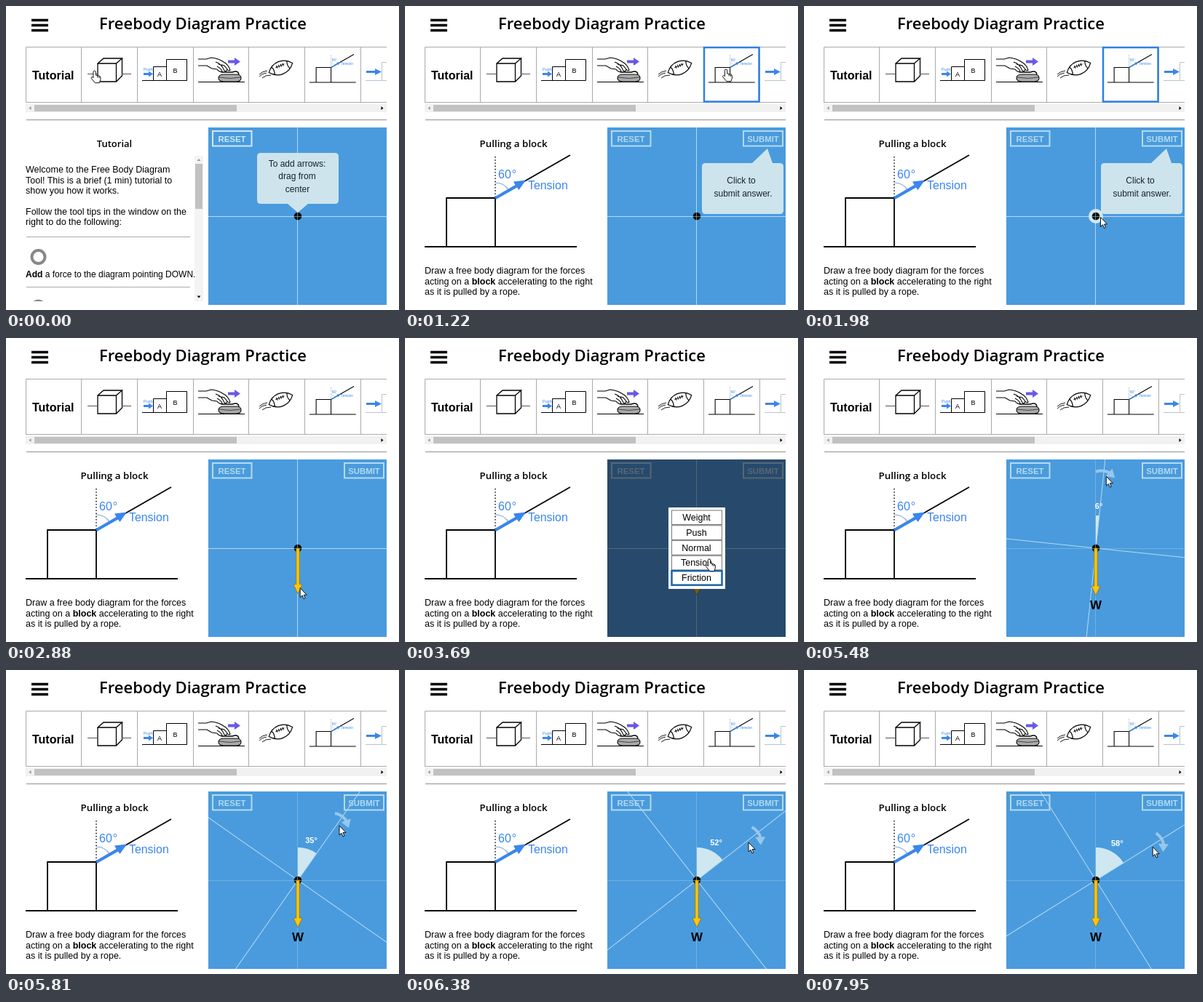
An HTML page for the animation above (8 s loop, 540 px wide and 418 px high).

```html
<!DOCTYPE html>
<html lang="en">
<head>
<meta charset="utf-8">
<title>Freebody Diagram Practice</title>
<style>
html, body { margin: 0; width: 100%; height: 100%; overflow: hidden; background: #fff; }
svg { display: block; }
text { font-family: "Liberation Sans", Arial, sans-serif; font-size: 12.5px; }
.head { font-family: "Open Sans", "Noto Sans", sans-serif; font-weight: 600; text-anchor: middle; }
.mid { text-anchor: middle; }
.bold { font-weight: bold; }
.blue { fill: #3a86ec; stroke: none; }
.tip text { font-size: 12px; fill: #16222a; text-anchor: middle; }
.tip path { fill: #d3e8ee; opacity: .96; }
.button rect { fill: none; stroke: currentColor; stroke-width: 2; }
.button text { font-size: 11.4px; font-weight: bold; fill: currentColor; text-anchor: middle; }
.line { fill: none; stroke: #000; }
</style>
</head>
<body>
<svg width="540" height="418" viewBox="0 0 540 418">
  <defs>
    <clipPath id="stripClip"><rect x="26" y="55" width="497" height="79"/></clipPath>
    <clipPath id="textClip"><rect x="20" y="200" width="240" height="206"/></clipPath>
    <g id="pull">
      <path class="line" d="M27 331H236M57 264H124V331H57ZM124 264L227 205"/>
      <path d="M124 207V264" stroke="#222" stroke-width="1.6" stroke-dasharray="1.6 2.6"/>
      <path d="M124 243A21 21 0 0 1 142.500 253.500" fill="none" stroke="#7fa9d8" stroke-width="1.200"/>
      <path class="blue" d="M123 262.500L151.500 246L149 241.500L166 239.500L156.500 253L154 249.500L125 266Z"/>
      <text class="blue" x="128" y="237" style="font-size:16px">60<tspan dx="1">°</tspan></text>
      <text class="blue" x="169" y="252" style="font-size:15.900px">Tension</text>
    </g>
  </defs>

  <path d="M35 19.500H58M35 26.500H58M35 33.500H58" stroke="#000" stroke-width="3.400"/>
  <text class="head" x="270.500" y="32" style="font-size:22px">Freebody Diagram Practice</text>

  <!-- thumbnail strip -->
  <g clip-path="url(#stripClip)">
    <path d="M27.500 132V56.500H523M103.500 56V132M180.500 56V132M257.500 56V132M333.500 56V132M410.500 56V132M487.500 56V132M27 132.500H523" fill="none" stroke="#aaa"/>
    <text class="bold" x="36" y="100.500" style="font-size:16px">Tutorial</text>
    <path class="line" d="M126 79H151.500V104H126ZM126 79L134 72H159.500L151.500 79M159.500 72V96L151.500 104" stroke-width="1.300"/>
    <path d="M112 93.500H126M159 93.500H172" stroke="#555"/>
    <path class="line" d="M187 102.500H248.500V73.500H220.500V102M202.500 102V83.500H220"/>
    <path class="blue" d="M189 92H196V89.500L202 93.500L196 97.500V95H189Z"/>
    <text class="blue" x="189" y="89" style="font-size:5.500px">Push</text>
    <text class="mid" x="211" y="96.500" style="font-size:9px">A</text>
    <text class="mid" x="232.500" y="91.500" style="font-size:9px">B</text>
    <path class="line" d="M264 104.500H328"/>
    <path d="M292 99Q292 94 300 94H316Q323 94 323 99Q323 104 316 104H300Q292 104 292 99Z" fill="#aaa" stroke="#111" stroke-width="1.200"/>
    <path d="M293 98Q308 101 322 98" fill="none" stroke="#444"/>
    <path class="line" d="M296 91H311Q319 88 320 94" stroke-width="1.500"/>
    <path class="line" d="M264 73H275L282 71Q292 72 299 77Q305 80 308 88Q306 90 304 87L300 82L292 80M264 82H276L283 86L290 87Q294 92 297 90Q296 86 290 83M288 77Q296 79 300 89Q303 91 304 87" stroke-width="1.100"/>
    <path fill="#6858e8" d="M305 74.500H314V71L322 76.500L314 82V78.500H305Z"/>
    <g class="line" transform="rotate(-22 377.500 85)">
      <path d="M360 85Q367 76 377.500 76Q388 76 395 85Q388 94 377.500 94Q367 94 360 85ZM366 79Q369 85 366 91M389 79Q386 85 389 91" stroke-width="1.200"/>
      <path d="M371 82H384M373 80V84M376 80V84M379 80V84M382 80V84"/>
    </g>
    <path class="line" d="M348 97Q351 93 358 92M352 99Q356 95 364 95M348 94Q352 90 359 89" stroke-width=".9"/>
    <use href="#pull" transform="translate(417 105) scale(.305) translate(-27 -331)" stroke-width="3.500"/>
    <path class="blue" d="M495 89H507V86L516 90.500L507 95V92H495Z"/>
    <path d="M530 77.500H516.500V102.500H530M494 102.500H516" fill="none" stroke="#b8c4cc"/>
  </g>
  <rect id="chosen" x="411" y="57" width="75.500" height="74.500" fill="none" stroke="#2f80e4" stroke-width="2.500"/>
  <rect x="27" y="135" width="496" height="11" fill="#f1f1f1"/>
  <rect x="39" y="136" width="278" height="9" fill="#c1c1c1"/>
  <path d="M34.500 138V143L31.500 140.500Z" fill="#999"/>
  <path d="M515.500 138V143L518.500 140.500Z"/>
  <path d="M28 156.500H523" stroke="#aaa" stroke-width="1.300"/>

  <g id="intro">
    <text class="head" x="149" y="194" style="font-size:13px">Tutorial</text>
    <g clip-path="url(#textClip)">
      <text x="27" y="229">Welcome to the Free Body Diagram</text>
      <text x="27" y="243.500">Tool! This is a brief (1 min) tutorial to</text>
      <text x="27" y="258">show you how it works.</text>
      <text x="27" y="286.500">Follow the tool tips in the window on the</text>
      <text x="27" y="301">right to do the following:</text>
      <path d="M28 317.500H253M28 386.500H253" stroke="#aaa"/>
      <g fill="none" stroke="#888" stroke-width="4"><circle cx="44.500" cy="345" r="9"/><circle cx="44.500" cy="414.500" r="9"/></g>
      <text x="27" y="373" style="font-size:12px"><tspan class="bold">Add</tspan> a force to the diagram pointing DOWN.</text>
    </g>
    <rect x="259" y="206" width="12" height="200" fill="#f4f4f4"/>
    <rect x="260" y="217" width="10" height="62" fill="#c1c1c1"/>
    <path d="M262.500 213H267.500L265 210Z" fill="#999"/>
    <path d="M262.500 398.500H267.500L265 401.500Z"/>
  </g>

  <g id="task">
    <text class="head" x="149" y="194" style="font-size:13.400px">Pulling a block</text>
    <use href="#pull" stroke-width="1.800"/>
    <text x="27" y="368">Draw a free body diagram for the forces</text>
    <text x="27" y="382.500">acting on a <tspan class="bold">block</tspan> accelerating to the right</text>
    <text x="27" y="397">as it is pulled by a rope.</text>
  </g>

  <!-- drawing panel -->
  <svg x="278" y="167" width="245" height="244" viewBox="278 167 245 244">
    <rect x="278" y="167" width="245" height="244" fill="#4a9bdd"/>
    <path id="axes" d="M400.500 167V411M278 289.500H523" stroke="#b4d8f0"/>
    <g id="reset" class="button"><rect x="284" y="172" width="53.500" height="20.500"/><text x="310.500" y="186.500">RESET</text></g>
    <g id="submit" class="button" color="#b4daee"><rect x="465" y="172" width="54" height="20.500"/><text x="492" y="186.500">SUBMIT</text></g>
    <path id="wedge" fill="#cfe7f0"/>
    <g id="turner">
      <path id="cross" d="M401 39V539M151 289H651" stroke="#b4daee"/>
      <path d="M390 184.500Q400 180 410 184.500" fill="none" stroke="#98c7ec" stroke-width="4"/>
      <path d="M412 178L417 190L404 189.500Z" fill="#98c7ec"/>
    </g>
    <text id="degrees" class="mid bold" fill="#fff" style="font-size:11px"></text>
    <circle id="ring" cx="401" cy="289" r="10" fill="#cfe7f0"/>
    <circle cx="401" cy="289" r="5.300" fill="#0c0c0c"/>
    <path d="M400.500 284V294M396 289.500H406" stroke="#9fc4dc" stroke-width=".6"/>
    <path id="force" fill="#fac60c" stroke="#8a7420" stroke-width=".8"/>
    <text id="weight" class="mid bold" x="401" y="373" style="font-size:17px">W</text>
    <g id="addTip" class="tip">
      <path d="M350 202H452Q457 202 457 207V267Q457 272 452 272H415L401 284L387 272H350Q345 272 345 267V207Q345 202 350 202Z"/>
      <text x="400" y="220.500">To add arrows:</text><text x="400" y="238">drag from</text><text x="400.500" y="255.500">center</text>
    </g>
    <g id="submitTip" class="tip">
      <path d="M413 216H477L498 196L505 216H515Q520 216 520 221V281Q520 286 515 286H413Q408 286 408 281V221Q408 216 413 216Z"/>
      <text x="462" y="244">Click to</text><text x="464.500" y="261.500">submit answer.</text>
    </g>
    <g id="menu">
      <rect x="278" y="167" width="245" height="244" fill="#0c0812" opacity=".55"/>
      <rect x="362" y="233" width="78" height="112" fill="#fff"/>
      <g id="options"></g>
    </g>
  </svg>

  <path id="cursor" fill="#fff" stroke="#111"/>
</svg>
<script>
const $ = id => document.getElementById(id);
const show = (id, on) => $(id).style.display = on ? "" : "none";
const within = (t, from, to) => t >= from && t < to;

const HAND = "M0 0q1.8 0 1.8 2v4l5 1.200q1.600.5 1.600 2v3l-1.500 4.500h-6l-5-6q-1-1.500.5-2q1-.3 2 1v-8q0-1.700 1.600-1.700zM4.300 7v2.500M6.500 7.500v2.500";
const ARROW = "M0 0V13L3 10.200L5 15L7 14L5 9.500H9z";
const HOVER_LAG = 140;

// cursor tip: time, x, y
const path = [
  [0, 121.5, 89], [89, 121.5, 89], [90, 153, 83], [265, 153, 83], [340, 240, 66], [410, 331, 84],
  [585, 331, 84], [790, 441, 87], [1450, 441, 87], [1630, 419, 303], [1800, 419, 303],
  [1980, 407.5, 290.5], [2210, 407.5, 290.5], [2910, 404, 346], [3530, 404, 346], [3540, 405, 338],
  [3690, 418, 304], [4120, 410, 248], [4480, 405, 251], [4540, 405, 251], [5190, 404.6, 187],
  [5400, 404.6, 187], [5600, 431, 195], [5810, 458, 214], [6200, 470, 233], [6380, 472, 237],
  [6440, 473, 238], [6620, 473, 238], [7370, 478.4, 242], [7510, 478.4, 242], [7620, 479.2, 243.2],
  [8000, 479.2, 243.2]
];

function cursorAt(t) {
  const i = path.findIndex(p => p[0] > t);
  const [t0, x0, y0] = path[i - 1], [t1, x1, y1] = path[i];
  const k = (t - t0) / (t1 - t0);
  return [x0 + (x1 - x0) * k, y0 + (y1 - y0) * k];
}

const rowY = i => 247 + i * 20.8;
$("options").innerHTML = ["Weight", "Push", "Normal", "Tension", "Friction"].map((name, i) =>
  `<rect x="366.500" y="${rowY(i) - 10}" width="69" height="19.500" fill="#fff"/>
   <text class="mid" x="400.500" y="${rowY(i) + 4}">${name}</text>`).join("");
const rows = $("options").querySelectorAll("rect");

function drawDial(angle, dragging) {
  const polar = (r, deg) => {
    const a = deg * Math.PI / 180;
    return [401 + r * Math.sin(a), 289 - r * Math.cos(a)];
  };
  $("turner").setAttribute("transform", `rotate(${angle} 401 289)`);
  $("wedge").setAttribute("d", `M401 289V244A45 45 0 0 1 ${polar(45, angle)}Z`);
  const [x, y] = polar(58.5, angle / 2 + 1);
  $("degrees").setAttribute("x", x);
  $("degrees").setAttribute("y", y + 4);
  $("degrees").textContent = angle + "°";
  for (const id of ["wedge", "degrees", "cross"]) show(id, dragging);
  $("axes").style.opacity = dragging ? .35 : 1;
}

function draw(t) {
  const [x, y] = cursorAt(t);
  const intro = t < 1220, dragging = t >= 5420;
  show("intro", intro);
  show("addTip", intro);
  show("task", !intro);
  show("submit", !intro);
  $("reset").setAttribute("color", intro ? "#cfe8f2" : "#b4daee");
  show("chosen", within(t, 1220, 2240));
  show("submitTip", within(t, 1220, 2240));
  show("ring", within(t, 1930, 2240));

  show("force", t >= 2240);
  const end = t < 2910 ? Math.min(354, y + 8) : 354;
  $("force").setAttribute("d", `M398.800 289V${end - 13}H395L401 ${end}L407 ${end - 13}H403.200V289Z`);
  show("weight", t >= 4480);

  show("menu", within(t, 3310, 4480));
  const hover = Math.round((cursorAt(Math.max(0, t - HOVER_LAG))[1] - rowY(0)) / 20.8);
  rows.forEach((row, i) => {
    const on = i === Math.min(4, hover);
    row.setAttribute("stroke", on ? "#1c63a8" : "#777");
    row.setAttribute("stroke-width", on ? 2.5 : 1);
  });

  show("turner", t >= 5000);
  const bearing = Math.atan2(x - 401, 289 - y) * 180 / Math.PI;
  drawDial(dragging ? Math.round(bearing - 2) : 0, dragging);

  const hand = t < 1500 || within(t, 3540, 4600);
  $("cursor").setAttribute("d", hand ? HAND : ARROW);
  $("cursor").setAttribute("transform", `translate(${x} ${y})`);
}

function tick() {
  draw(performance.now() % 8000);
  requestAnimationFrame(tick);
}
tick();
</script>
</body>
</html>
```
